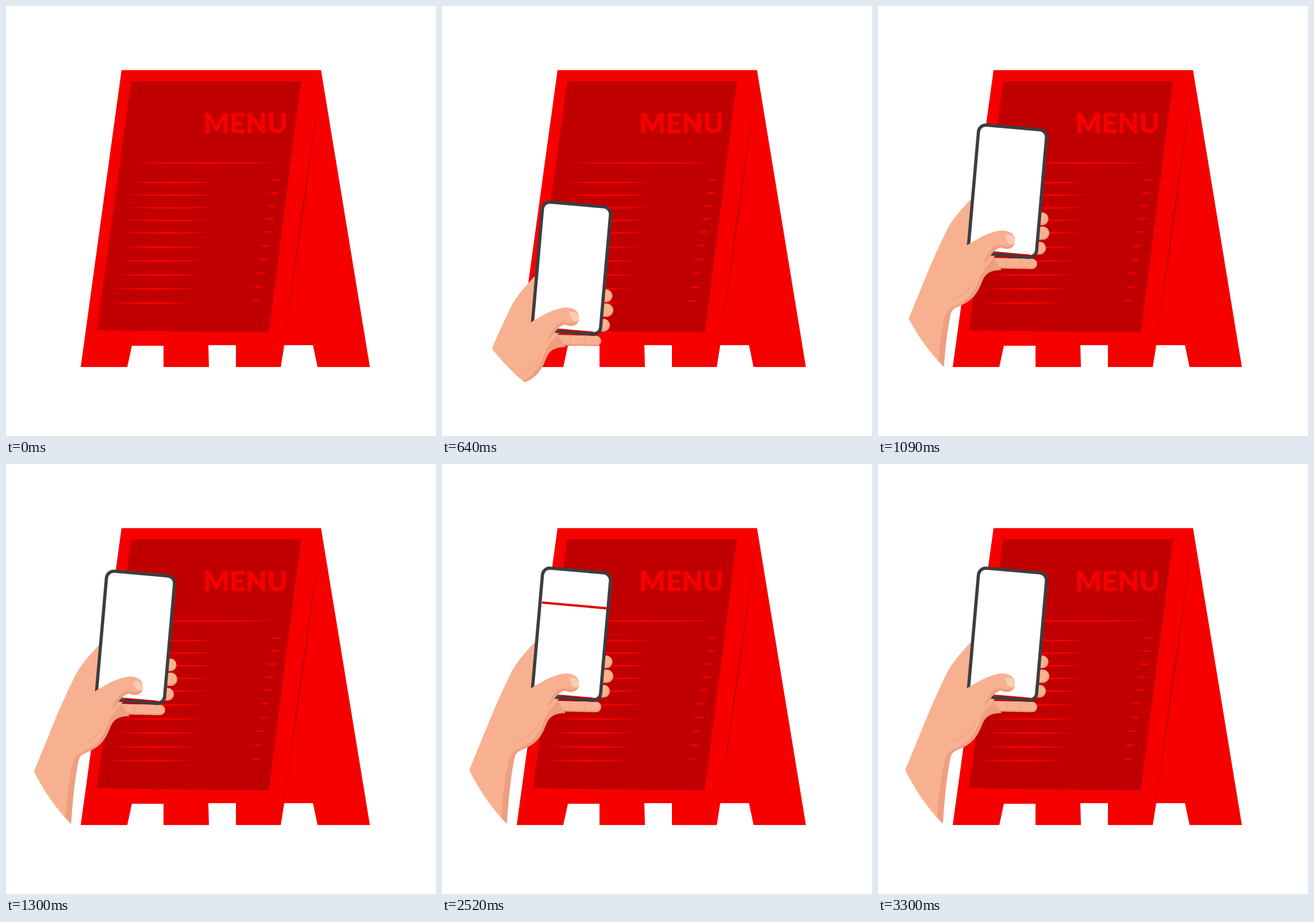
Recreate the animation shown at these times as an HTML page. Size 748 by 748 pixels, loop 3.97 s.

```html
<!DOCTYPE html>
<html lang="en">
<head>
<meta charset="utf-8">
<title>Menu scan</title>
<style>
  html, body { margin: 0; width: 100%; height: 100%; overflow: hidden; background: #fff; }
  svg { display: block; width: 100vw; height: 100vh; }
  .skin { fill: #f8b190; stroke: #f8b190; }
  .shade { fill: #ee9f80; stroke: #ee9f80; }
  path.skin, path.shade { stroke: none; }
  line { stroke-linecap: round; }
  .crease { fill: none; stroke: #ee9f80; stroke-width: 1.3; stroke-linecap: round; }
</style>
</head>
<body>
<svg viewBox="0 0 748 748">
  <clipPath id="disc"><circle cx="374" cy="374" r="363"/></clipPath>

  <path fill="#f60000" d="M201 111.500H548L633 628H542L534 590H484L478 628H400V590H352L353 628H274V591H219L211 628H130Z"/>
  <path fill="#c00000" d="M218 131H513L457 568L158 564Z"/>
  <path fill="#a80000" d="M548 130L516 363L483 592L514 363Z"/>
  <g id="rows" fill="#f60000"></g>
  <text x="416.500" y="221" text-anchor="middle" fill="#f60000" font-family="Lato, sans-serif" font-weight="900" font-size="48">MENU</text>

  <g clip-path="url(#disc)">
    <g id="hand">
      <g id="fingers"></g>

      <!-- forearm and palm -->
      <path class="shade" d="M200 412L215 434C183 434 184 451 176 466C165 487 152 492 141 497C128 502 127 507 125 518Q117 560 113 626V660H88L100 510L150 440Z"/>
      <path class="skin" d="M161 311C144 329 128 348 120 364C106 393 95 417 86 439L47 534L36 563L101 650C103 601 107 563 113 530C117 508 121 501 133 496C153 488 164 477 171 462C179 444 182 431 196 420L210 400L180 340Z"/>

      <!-- phone -->
      <g transform="translate(225.300 297) rotate(5)">
        <rect x="-57.500" y="-109.500" width="115" height="217" rx="11" fill="#fff"/>
        <rect x="-59.400" y="-111.400" width="118.800" height="222.800" rx="13" fill="none" stroke="#3d3d3f" stroke-width="5.600"/>
        <path d="M-18 107.400H48" stroke="#d60000" stroke-width="2"/>
        <rect id="beam" x="-56" y="-2" width="113" height="4" fill="#e30000"/>
      </g>

      <!-- thumb -->
      <path class="shade" d="M160 405C180 385 206 372 224 382L238 387C236 397 224 400 214 395C205 396 198 405 190 417L178 428Z"/>
      <path class="skin" d="M153 392C173 380 190 369 211 365.500C230 364 240 372 238 386C235 393 223 395 212 390C200 391 195 400 188 412C183 420 181 431 176 444L150 452L126 420Z"/>
      <path fill="#fccbb5" d="M220 374C226 371 234 373 237 379C240 386 237 390 231 389C223 387 225 378 220 374Z"/>
      <path class="crease" d="M128 485Q160 474 171 448M224 414Q222 420 225 427M249 416Q247 422 250 429"/>
    </g>
  </g>
</svg>
<script>
const LOOP = 3970;
const byId = id => document.getElementById(id);
const clamp = v => Math.max(0, Math.min(1, v));

// Thin stroke that tapers to both ends
function taper(x, y, w, h = 2.2) {
  const half = w / 2;
  return `<path d="M${x} ${y}q${half} ${-h} ${w} 0q${-half} ${h * 2} ${-w} 0Z"/>`;
}

// Menu entries follow the slant of the board; the lower ones are spaced wider
function menuRow(i) {
  const low = Math.max(0, i - 4);
  const item = taper(218 - 1.6 * i - 0.29 * i * i, 306.5 + 22 * i + 2.3 * low, 144);
  const price = taper(462 - 4 * i, 302.5 + 22.5 * i + 1.5 * low, 18);
  return item + price;
}
byId('rows').innerHTML = taper(216, 272.5, 264) + Array.from({ length: 10 }, (_, i) => menuRow(i)).join('');

// Rounded finger with its shaded underside
function finger(tip, y, length, width, slope = 0) {
  const x = tip - width / 2;
  const bar = (kind, w, dy) =>
    `<line class="${kind}" x1="${x - length}" y1="${y + dy - slope}" x2="${x}" y2="${y + dy}" stroke-width="${w}"/>`;
  return bar('shade', width, 0) + bar('skin', width - 3, -1.5);
}
byId('fingers').innerHTML =
  finger(296.5, 345, 20, 22) + finger(298, 370, 20, 23) + finger(292, 396, 20, 22) +
  finger(277, 423.5, 68, 18, 1.5);

const hand = byId('hand'), beam = byId('beam');

function draw(t) {
  const drop = 160 * Math.pow(Math.max(0, 1570 - t) / 930, 2.75) - 0.8;
  hand.setAttribute('transform', `translate(0 ${drop.toFixed(2)})`);

  // Scan beam: up, then back down
  const sweep = (1 - Math.cos(clamp((t - 2150) / 1060) * 2 * Math.PI)) / 2;
  const alpha = Math.min(clamp((t - 2120) / 90), clamp((3300 - t) / 90));
  beam.setAttribute('transform', `translate(0 ${(33.5 - 106 * sweep).toFixed(2)})`);
  beam.setAttribute('opacity', alpha.toFixed(3));
}

let start = null;
function tick(now) {
  if (start === null) start = now;
  draw((now - start) % LOOP);
  requestAnimationFrame(tick);
}
draw(0);
requestAnimationFrame(tick);
</script>
</body>
</html>
```
